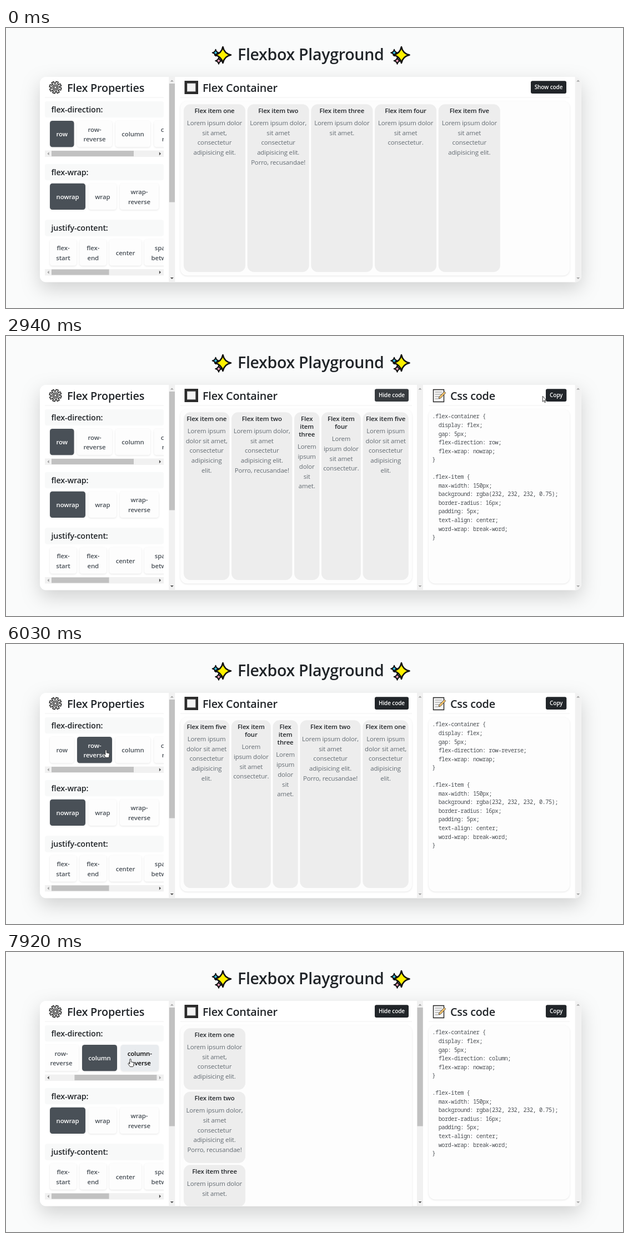
Animation of 1111 by 504 pixels, one loop 7.99 s. Source, as an HTML page:

```html
<!DOCTYPE html>
<html lang="en">
<head>
<meta charset="utf-8">
<title>Flexbox Playground</title>
<style>
html, body { margin: 0; height: 100%; overflow: hidden; background: #fafbfb; }
svg { display: block; width: 1111px; height: 504px; }
text { font: 11.4px "Open Sans", "Noto Sans", sans-serif; letter-spacing: -.01em; fill: #212529; }
.title, .h3, .h5, .h6, .btn, .small { font-weight: 600; }
.title { font-size: 28.5px; }
.h3 { font-size: 19.8px; }
.h5 { font-size: 14.3px; }
.small { font-size: 10px; }
.body { fill: #636b72; }
.code { font: 10.36px "Noto Sans Mono", "DejaVu Sans Mono", monospace; letter-spacing: -.55px; fill: #4b4f54; white-space: pre; }
.mid { text-anchor: middle; }
.card { filter: drop-shadow(0 12px 17px rgba(0,0,0,.17)); }
.soft { filter: drop-shadow(0 1px 1.5px rgba(0,0,0,.1)); }
</style>
</head>
<body>
<svg id="stage" viewBox="0 0 1111 504">
  <defs>
    <clipPath id="panel"><rect x="61" y="88" width="975" height="369.5" rx="11"/></clipPath>
    <clipPath id="props"><rect x="70" y="88" width="214" height="369"/></clipPath>
  </defs>
  <g id="page"></g>
  <g id="pointer"></g>
</svg>
<script>
const LOOP = 7990, TICK = 66;
const OPEN = 2880, REVERSE = 5370, COLUMN = 6850, SCROLL = 7380;

// Pointer moves: start time, then one position per tick.
const moves = [
  [730, [461,467], [428,467]],
  [1200, [398,462], [355,430], [341,352], [400,215], [515,105], [633,59],
         [722,66], [800,87], [862,110], [902,128], [926,139], [937,142]],
  [2020, [943,135], [952,122], [960,113], [964,110], [966,108], [966,108]],
  [3810, [699,156], [480,178], [310,190], [226,192]],
  [4350, [220,192], [208,192], [190,191], [173,191], [163,190], [160,190]],
  [6030, [180,191], [206,192], [219,193]],
  [7920, [224,193]]
];
const presses = [[2680, OPEN], [5100, REVERSE], [6630, COLUMN]];

const GAP = 3.7, WIDE = 111;
const narrow = [82.4, 109.3, 45.2, 70.9, 82.2];
const wideText = [
  'Lorem ipsum dolor|sit amet,|consectetur|adipisicing elit.',
  'Lorem ipsum dolor,|sit amet|consectetur|adipisicing elit.|Porro, recusandae!',
  'Lorem ipsum dolor|sit amet.',
  'Lorem ipsum dolor|sit amet|consectetur.',
  'Lorem ipsum dolor|sit amet|consectetur|adipisicing elit.'
];
const narrowText = [
  'Lorem ipsum|dolor sit amet,|consectetur|adipisicing|elit.',
  wideText[1],
  'Lorem|ipsum|dolor|sit|amet.',
  'Lorem|ipsum dolor|sit amet|consectetur.',
  'Lorem ipsum|dolor sit amet|consectetur|adipisicing|elit.'
];
const wideHead = ['one', 'two', 'three', 'four', 'five'].map(n => 'Flex item ' + n);
const narrowHead = [wideHead[0], wideHead[1], 'Flex|item|three', 'Flex item|four', wideHead[4]];

// Option buttons: left, width, label.
const directions = [[79, 43.5, 'row'], [128, 63, 'row-|reverse'], [197, 63, 'column'], [266.5, 68.5, 'column-|reverse']];
const wraps = [[79, 64, 'nowrap'], [148.5, 50.5, 'wrap'], [205, 70, 'wrap-|reverse']];
const justify = [[79, 48, 'flex-|start'], [132.5, 48.5, 'flex-|end'], [186, 58, 'center'], [249, 72, 'space-|between']];

const ramp = (t, a, b) => Math.min(1, Math.max(0, (t - a) / (b - a)));
const rect = (x, y, w, h, fill, r = 0, cls = '') =>
  `<rect x="${x}" y="${y}" width="${w}" height="${h}" rx="${r}" fill="${fill}" class="${cls}"/>`;
const path = (d, fill, more = '') => `<path d="${d}" fill="${fill}" ${more}/>`;
const text = (x, y, s, cls, style = '') => `<text x="${x}" y="${y}" class="${cls}" style="${style}">${s}</text>`;
const lines = (x, y, s, step, cls, style) =>
  s.split('|').map((line, i) => text(x, y + i * step, line, cls, style)).join('');

function star(x, y, r, fill, width) {
  const c = r * .17;
  return path(`M0 ${-r}Q${c} ${-c} ${r} 0Q${c} ${c} 0 ${r}Q${-c} ${c} ${-r} 0Q${-c} ${-c} 0 ${-r}Z`, fill,
    `stroke="#111" stroke-width="${width}" stroke-linejoin="round" transform="translate(${x} ${y})"`);
}
const sparkles = x =>
  star(x + 6.5, 44.5, 5.8, '#3bc9f0', 2) + star(x + 12, 59, 5.8, '#f7a8c4', 2) + star(x + 19.5, 48.5, 14.5, '#fff100', 2.6);

const gear = `<g transform="translate(89 107)" fill="none" stroke="#111">
  <circle r="9.2" stroke-width="4.6" stroke-dasharray="5 2.225"/>
  <circle r="8" fill="#d8d8d8" stroke-width="1.6"/>
  <circle r="8.6" stroke="#d8d8d8" stroke-width="3" stroke-dasharray="2.8 3.955" stroke-dashoffset="-.95"/>
  <circle r="5" fill="#c2c2c2" stroke-width="1.1"/><circle r="2.5" fill="#fff" stroke-width="1.1"/></g>`;
const frameIcon = rect(321.5, 95, 24.5, 24, '#2b2b2b') + rect(326, 99.5, 15.5, 15, '#d0d0d0') + rect(327, 100.5, 13.5, 13, '#f4f4f4');
const memo = path('M769.5 96.5H788.5V118.5H769.5Z', '#f7f7f7', 'stroke="#222" stroke-width="1.4"') +
  path('M772.5 101H785M772.5 105H785M772.5 109H781M772.5 113H778', 'none', 'stroke="#888"') +
  path('M779 113L780 109.5 789.3 100 791.8 102.4 782.5 112Z', '#f7c46c', 'stroke="#222" stroke-width=".8" stroke-linejoin="round"');

const tip = (x, y, angle, live) =>
  path('M-3 1.6L0 -1.6 3 1.6Z', live ? '#505050' : '#a3a3a3', `transform="translate(${x} ${y}) rotate(${angle})"`);
const vbar = (x, thumb) => rect(x, 88, 11, 369.5, '#f1f1f1') + (thumb ? rect(x + .5, 100, 10.2, 213.5, '#c1c1c1') : '') +
  tip(x + 5.5, 95, 0, false) + tip(x + 5.5, 450.5, 180, thumb);
const hbar = (y, x, w, atEnd) => rect(70, y, 214, 11.5, '#f1f1f1') + rect(x, y + .5, w, 10, '#c1c1c1') +
  tip(76, y + 5.7, -90, atEnd) + tip(277.5, y + 5.7, 90, !atEnd);

function options(list, y, chosen, hover = -1, shift = 0) {
  return list.map(([x, w, label], i) => {
    const [fill, ink] = i === chosen ? ['#495057', '#fff'] : i === hover ? ['#e9ecef', '#000'] : ['#fdfdfd', '#495057'];
    const base = y + (label.includes('|') ? 19.5 : 28.3);
    return rect(x - shift, y, w, 47.3, fill, 4.5, 'soft') +
      lines(x - shift + w / 2, base, label, 17.75, 'btn mid', 'fill:' + ink);
  }).join('');
}
const section = (y, label) => rect(70, y, 214, 29.5, '#f8f9f9', 4) + text(81.5, y + 20.2, label, 'h5');
const button = (x, w, label, fill) => rect(x, 95.3, w, 22.7, fill, 3) +
  text(x + w / 2, 110.4, label, 'small mid', 'fill:#fff');
const rule = (x, w) => rect(x, 124.6, w, 1, '#f0f0f0');

function item(x, y, w, h, head, body) {
  const extra = (head.split('|').length - 1) * 14.25;
  return rect(x, y, w, h, '#ededed', 11.85) +
    lines(x + w / 2, y + 15.6, head, 14.25, 'h6 mid') +
    lines(x + w / 2, y + 37.7 + extra, body, 17.75, 'body mid');
}

function items(open, dir) {
  let x = 320, y = 137.2;
  const order = dir === 1 ? [4, 3, 2, 1, 0] : [0, 1, 2, 3, 4];
  return order.map(i => {
    const slim = open && dir < 2, w = slim ? narrow[i] : WIDE;
    const body = (slim ? narrowText : wideText)[i];
    const h = dir === 2 ? 39.5 + 17.75 * body.split('|').length : 302;
    const out = item(x, y, w, h, (slim ? narrowHead : wideHead)[i], body);
    if (dir === 2) y += h + GAP; else x += w + GAP;
    return out;
  }).join('');
}

function codePanel(dir) {
  const css = `.flex-container {
  display: flex;
  gap: 5px;
  flex-direction: ${['row', 'row-reverse', 'column'][dir]};
  flex-wrap: nowrap;
}

.flex-item {
  max-width: 150px;
  background: rgba(232, 232, 232, 0.75);
  border-radius: 16px;
  padding: 5px;
  text-align: center;
  word-wrap: break-word;
}`;
  return memo + text(800, 114.5, 'Css code', 'h3') + button(972, 37.3, 'Copy', '#212529') + rule(761, 254) +
    rect(761, 131.5, 254, 314, '#fdfdfd', 12, 'soft') +
    css.split('\n').map((line, i) => text(767.3, 148.4 + i * 15.55, line, 'code')).join('');
}

function page({ open, dir, shift, hover, glow }) {
  const right = open ? 731 : 1015;
  const dark = `rgb(${33 + 33 * glow},${37 + 33 * glow},${41 + 32 * glow})`;
  return sparkles(371) + text(417, 58.3, 'Flexbox Playground', 'title') + sparkles(692.5) +
    rect(61, 88, 975, 369.5, '#fff', 11, 'card') +
    '<g clip-path="url(#panel)">' +
      '<g clip-path="url(#props)">' + gear + text(110, 114.5, 'Flex Properties', 'h3') + rule(70, 214) +
        section(131.7, 'flex-direction:') + options(directions, 167, dir, hover, shift) +
        hbar(220.5, 82 + shift * .69, 148, shift > 50) +
        section(244.7, 'flex-wrap:') + options(wraps, 279.8, 0) +
        section(345.2, 'justify-content:') + options(justify, 380.5, -1) + hbar(434, 82, 103.5, false) +
      '</g>' + vbar(293.3, true) +
      frameIcon + text(354, 114.5, 'Flex Container', 'h3') + rule(314, right - 314) +
      rect(314, 131.5, right - 314, dir === 2 ? 600 : 314, '#fdfdfd', 12, 'soft') + items(open, dir) +
      (open ? button(664, 61, 'Hide code', dark) + vbar(740, dir === 2) + codePanel(dir)
            : button(945, 64, 'Show code', dark)) +
      vbar(1024.7, false) +
    '</g>';
}

function locate(t) {
  const move = moves.findLast(m => t >= m[0]);
  if (!move) return null;
  return move[Math.min(move.length - 1, 1 + Math.floor((t - move[0]) / TICK))];
}

function pointer(pos, hand, pressed) {
  if (!pos) return '';
  const shape = hand
    ? 'M-1.2 .8Q-1.2 -.5 0 -.5T1.2 .8V4.8L5.2 5.6Q6.5 6 6.3 7.4L5.6 11.9 4.6 13.5H-.4L-4 8.7Q-4.4 7.5 -3.4 7.2-2.4 7.2 -1.2 8.6Z'
    : 'M.3 .3V10.2L2.5 8.2 4.1 11.7 5.6 11 4.1 7.6H7Z';
  return (pressed ? `<circle cx="${pos[0]}" cy="${pos[1]}" r="9" fill="#f1e51c" opacity=".75"/>` : '') +
    path(shape, '#fff', `stroke="#222" stroke-width=".9" stroke-linejoin="round" transform="translate(${pos})"`);
}

const layers = { page: '', pointer: '' };
function show(id, html) {
  if (layers[id] !== html) document.getElementById(id).innerHTML = layers[id] = html;
}

function draw() {
  const t = performance.now() % LOOP;
  const open = t >= OPEN, dir = t < REVERSE ? 0 : t < COLUMN ? 1 : 2;
  const shift = t < SCROLL ? 0 : t < SCROLL + 70 ? 34 : 60;
  const pos = locate(t), [px, py] = pos || [0, 0];
  const over = py > 166 && py < 215 && px < 284
    ? directions.findIndex(([x, w]) => px + shift >= x && px + shift <= x + w) : -1;
  const onShow = !open && px > 945 && px < 1009 && py > 95 && py < 118;
  const hover = t >= SCROLL && t < 7650 ? -1 : over;
  const glow = ramp(t, 2150, 2350) - ramp(t, OPEN, 3070);
  show('page', page({ open, dir, shift, hover, glow }));
  show('pointer', pointer(pos, onShow || over >= 0, presses.some(([a, b]) => t >= a && t < b)));
  requestAnimationFrame(draw);
}
draw();
</script>
</body>
</html>
```
